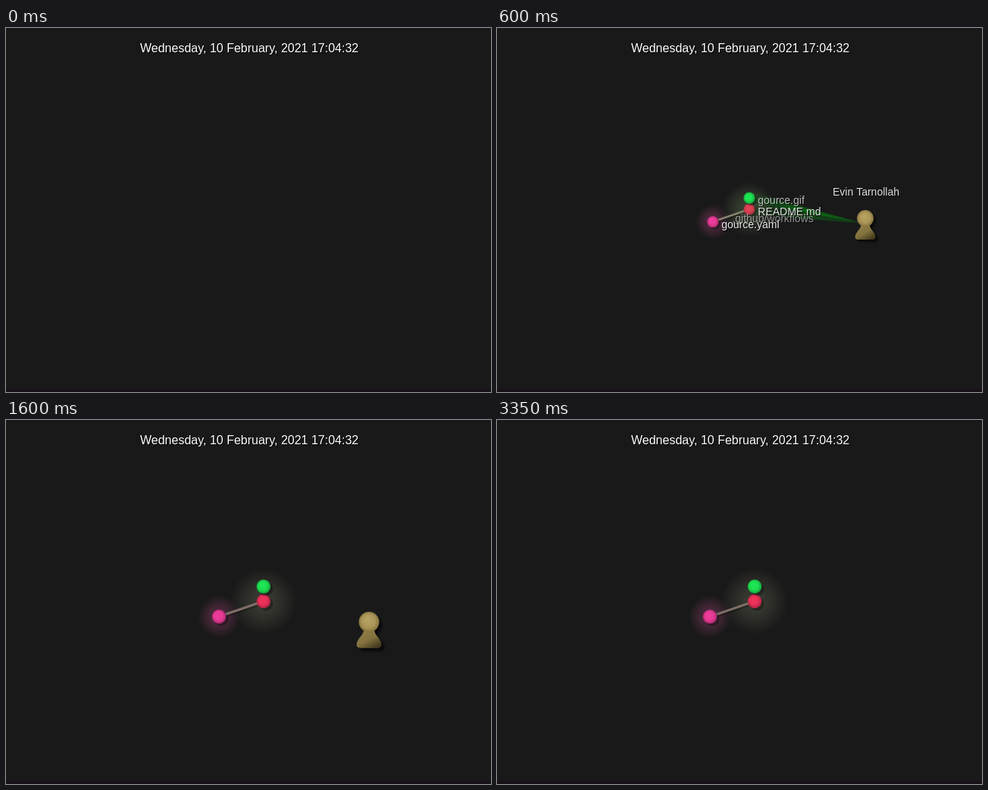
Recreate the animation shown at these times as an HTML page with a canvas. Size 640x480 px, loop 3.4 s.

```html
<!DOCTYPE html>
<html lang="en">
<head>
<meta charset="utf-8">
<title>Repository history</title>
<style>
html, body { margin: 0; width: 100%; height: 100%; overflow: hidden; background: #191919; }
canvas { display: block; }
</style>
</head>
<body>
<canvas id="stage" width="640" height="480"></canvas>
<script>
const ctx = document.getElementById('stage').getContext('2d');
const LOOP = 3400, STEP = 50;
const FONT = 'px "Liberation Sans", Arial, sans-serif';
const RED = [242, 50, 92], GREEN = [30, 232, 84], PINK = [240, 60, 155];

const clamp = v => Math.max(0, Math.min(1, v));
const ramp = (t, from, to) => clamp((t - from) / (to - from));
const mix = (a, b, k) => a.map((v, i) => v + (b[i] - v) * k);
const rgba = (c, a = 1) => `rgba(${c.map(Math.round)},${a})`;
const shade = (c, k) => c.map(v => v * k);

// Approach of the user, one point per 100 ms from 100 to 800
const pathX = [521, 516, 507, 497, 491, 486, 464, 436];
const pathY = [214, 228, 240, 250, 253.5, 251, 246, 243];

function userAt(t) {
  if (t >= 800) {
    const k = Math.exp((800 - t) / 267);
    return { x: 481.3 - 45.3 * k, y: 267.5 - 24.5 * k };
  }
  const p = (t - 100) / 100, i = Math.floor(p);
  const at = list => list[i] + (list[i + 1] - list[i]) * (p - i);
  return { x: at(pathX), y: at(pathY) };
}

function circle(x, y, r, fill) {
  ctx.fillStyle = fill;
  ctx.beginPath();
  ctx.arc(x, y, r, 0, 7);
  ctx.fill();
}

function label(text, x, y, alpha, size = 14) {
  if (alpha <= 0) return;
  ctx.globalAlpha = alpha;
  ctx.font = size + FONT;
  ctx.fillStyle = '#000';
  ctx.fillText(text, x + 1, y + 1);
  ctx.fillStyle = '#fff';
  ctx.fillText(text, x, y);
  ctx.globalAlpha = 1;
}

function glow(p, r, color, strength) {
  const g = ctx.createRadialGradient(p.x, p.y, 0, p.x, p.y, r);
  g.addColorStop(0, rgba(color, strength));
  g.addColorStop(0.5, rgba(color, strength * 0.55));
  g.addColorStop(0.85, rgba(color, strength * 0.16));
  g.addColorStop(1, rgba(color, 0));
  circle(p.x, p.y, r, g);
}

function ball(p, r, color, alpha) {
  ctx.globalAlpha = alpha;
  circle(p.x + r * 0.35, p.y + r * 0.35, r, 'rgba(0,0,0,.3)');
  const g = ctx.createRadialGradient(p.x - r * 0.25, p.y - r * 0.3, 0, p.x, p.y, r);
  g.addColorStop(0, rgba(color));
  g.addColorStop(0.6, rgba(shade(color, 0.96)));
  g.addColorStop(1, rgba(shade(color, 0.72)));
  circle(p.x, p.y, r, g);
  ctx.globalAlpha = 1;
}

function beam(from, to, r, alpha) {
  if (alpha <= 0) return;
  const dx = to.x - from.x, dy = to.y - from.y, len = Math.hypot(dx, dy);
  for (const width of [r, r * 0.5]) {
    const g = ctx.createLinearGradient(from.x, from.y, to.x, to.y);
    const stop = (at, a) => g.addColorStop(at, `rgba(0,165,15,${a * alpha})`);
    stop(0, 0.1);
    stop(0.15, 0.5);
    stop(0.45, 0.65);
    stop(0.75, 0.35);
    stop(1, 0.1);
    const nx = -dy / len * width, ny = dx / len * width;
    ctx.fillStyle = g;
    ctx.beginPath();
    ctx.moveTo(from.x, from.y);
    ctx.lineTo(to.x + nx, to.y + ny);
    ctx.lineTo(to.x - nx, to.y - ny);
    ctx.fill();
  }
}

function pawnBody() {
  ctx.beginPath();
  ctx.moveTo(-7, 11);
  ctx.bezierCurveTo(-8, 19, -16.5, 22, -16.5, 31);
  ctx.quadraticCurveTo(-16, 34.5, -10, 34.5);
  ctx.lineTo(10, 34.5);
  ctx.quadraticCurveTo(16, 34.5, 16.5, 31);
  ctx.bezierCurveTo(16.5, 22, 8, 19, 7, 11);
  ctx.fill();
}

function pawn(u, s, alpha) {
  if (alpha <= 0) return;
  ctx.save();
  ctx.globalAlpha = alpha;
  ctx.translate(u.x, u.y);
  ctx.scale(s, s);

  ctx.save();
  ctx.translate(4, 4);
  ctx.filter = 'blur(1px)';
  ctx.fillStyle = 'rgba(0,0,0,.6)';
  pawnBody();
  circle(0, 0, 13.3, 'rgba(0,0,0,.6)');
  ctx.restore();

  const body = ctx.createLinearGradient(-8, 12, 5, 36);
  body.addColorStop(0, '#8f7d45');
  body.addColorStop(0.5, '#84733f');
  body.addColorStop(1, '#453b1d');
  ctx.fillStyle = body;
  pawnBody();

  const head = ctx.createRadialGradient(-2, -4, 1, 0, 0, 13.5);
  head.addColorStop(0, '#b8a262');
  head.addColorStop(0.65, '#aa9557');
  head.addColorStop(1, '#84723f');
  circle(0, 0, 13.5, head);
  ctx.restore();
}

function scene(t) {
  // The camera closes in while its distance decays
  const s = 1 / (1 + 0.42 * Math.exp((450 - t) / 246));
  const root = { x: 320 + s * (20 - 7.2 * Math.exp((450 - t) / 273)), y: 239 };
  const gif = { x: root.x, y: 239 - 19.5 * s * (1 - 0.12 * Math.exp((450 - t) / 250)) };
  const yaml = { x: root.x - 59 * s, y: 239 + 20.3 * s };
  const r = 9.3 * s;
  const user = userAt(t);
  const source = { x: user.x, y: user.y + 9 * s };
  const fresh = 1 - ramp(t, 250, 750);
  const shown = ramp(t, 50, 250);

  glow(root, 44 * s, mix([105, 108, 88], [110, 175, 85], fresh), 0.48 * shown);
  glow(yaml, 28 * s, [170, 70, 125], 0.48 * shown);

  ctx.lineCap = 'round';
  const line = (off, width, style) => {
    ctx.lineWidth = width;
    ctx.strokeStyle = style;
    ctx.beginPath();
    ctx.moveTo(yaml.x + off, yaml.y + off);
    ctx.lineTo(root.x + off, root.y + off);
    ctx.stroke();
  };
  line(2 * s, 3 * s, `rgba(0,0,0,${0.25 * shown})`);
  line(0, 3 * s, rgba(mix([125, 110, 103], [150, 175, 120], fresh), shown));

  beam(source, yaml, r, 1 - ramp(t, 100, 430));
  beam(source, root, r, ramp(t, 150, 250) * (1 - ramp(t, 250, 720)));
  beam(source, gif, r * 1.1, ramp(t, 250, 350) * (1 - ramp(t, 350, 860)));

  ball(yaml, r, PINK, shown);
  ball(root, r, mix(RED, [95, 190, 50], clamp((650 - t) / 400)), ramp(t, 100, 300));
  ball(gif, r, GREEN, ramp(t, 250, 580));
  pawn(user, s, 1 - ramp(t, 1680, 2150));

  const side = 14 * s;
  label('.github/workflows', (root.x + yaml.x) / 2 + 1.5, (root.y + yaml.y) / 2 + 9,
    0.6 * ramp(t, 50, 250) * (1 - ramp(t, 500, 1380)));
  label('gource.yaml', yaml.x + side, yaml.y + 8, 0.92 * shown * (1 - ramp(t, 820, 1150)));
  label('README.md', root.x + side, root.y + 8,
    0.88 * ramp(t, 150, 500) * (1 - ramp(t, 950, 1370)));
  label('gource.gif', gif.x + side, gif.y + 8,
    0.88 * ramp(t, 300, 680) * (1 - ramp(t, 1080, 1580)));
  ctx.textAlign = 'center';
  label('Evin Tarnollah', user.x + 1, user.y - 14 - 19.5 * s, 0.88 * (1 - ramp(t, 950, 1450)));
  ctx.textAlign = 'left';
}

function draw(now) {
  const t = Math.floor(now % LOOP / STEP) * STEP;
  ctx.fillStyle = '#191919';
  ctx.fillRect(0, 0, 640, 480);
  ctx.fillStyle = '#191118';
  ctx.fillRect(0, 476, 640, 4);
  if (t >= 100) scene(t);
  label('Wednesday, 10 February, 2021 17:04:32', 177, 32, 1, 16);
}

const start = performance.now();
function tick() {
  draw(performance.now() - start);
  requestAnimationFrame(tick);
}
tick();
</script>
</body>
</html>
```
